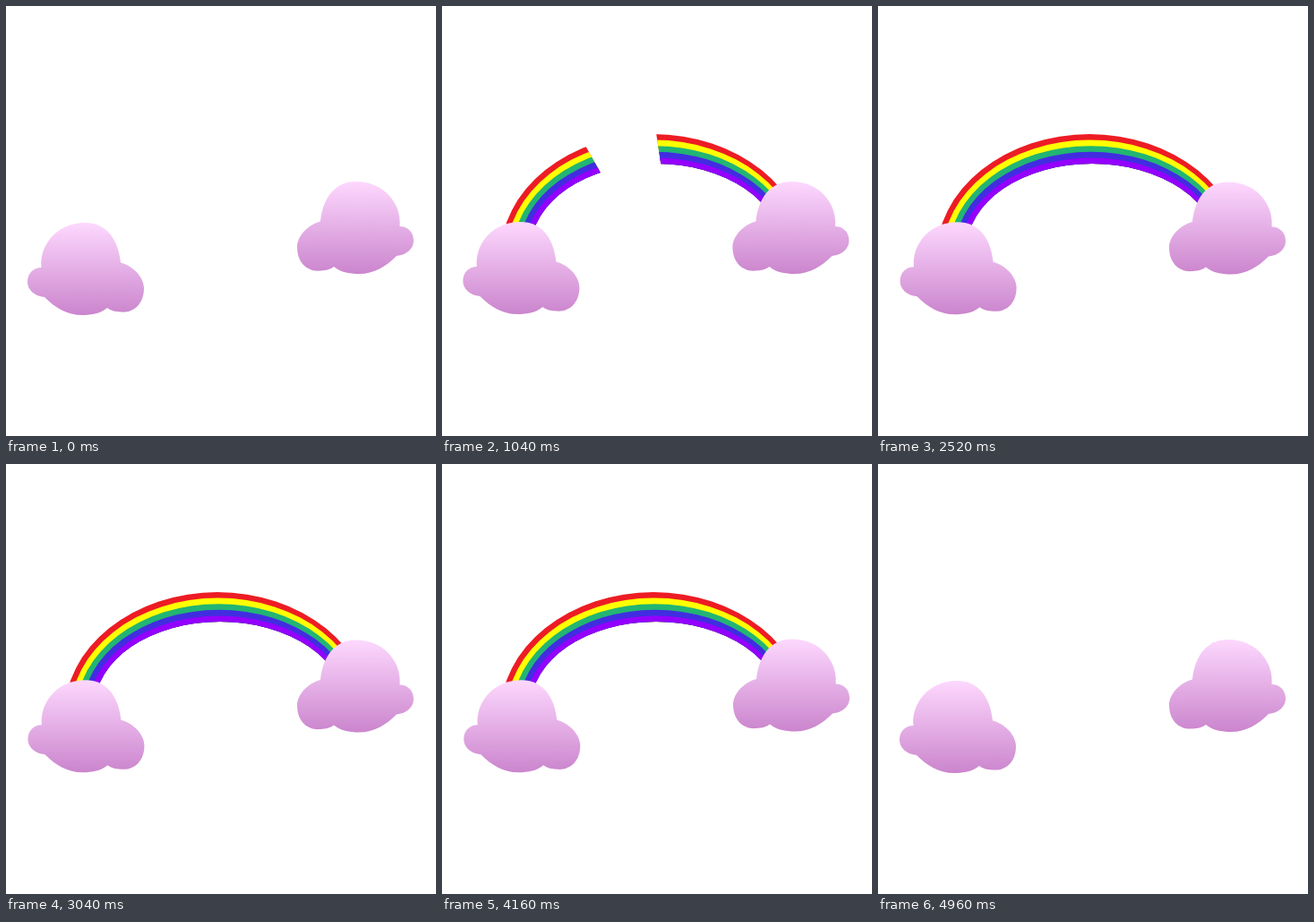
Write an HTML page with a canvas that moves like this. It is 480 by 480 pixels and loops after 5 s.

```html
<!DOCTYPE html>
<html>
<head>
<meta charset="utf-8">
<style>
html, body { margin: 0; width: 100%; height: 100%; overflow: hidden; background: #fff; }
canvas { display: block; width: 480px; height: 480px; }
</style>
</head>
<body>
<canvas id="stage" width="480" height="480"></canvas>
<script>
const ctx = document.getElementById('stage').getContext('2d');
const LOOP = 5000;
const BANDS = ['#ed1c24', '#ffff00', '#22b573', '#412de0', '#9400ff'];
const OUTER = [236, 280.5, 171, 137.5]; // centre x, centre y, radius x, radius y
const INNER = [239, 271, 140, 95];
const PIVOT = { x: 272, y: 357 };

const cloud = new Path2D(
  'M39.5 292C37 268 56 242 88 242C116 242 126 266 128 286.5' +
  'C142 290 154 303 154 315C154 333 142 343 128 341.5C121 341 117 340 113 337' +
  'C106 343 96 345 85 345C68 345 55 337 43 325C32 324 24 317 24 308C24 298 31 292 39.5 292Z');
const cloudFill = ctx.createLinearGradient(0, 242, 0, 345);
cloudFill.addColorStop(0, '#fdd8fe');
cloudFill.addColorStop(1, '#cb85cd');

// Keys are [time, dx, dy]
const LEFT_DRIFT = [[0, 0, 0], [500, -.5, -.8], [1040, -.6, -1], [1720, -.6, -1],
  [2520, .6, -.8], [3480, .3, -.8], [4160, .3, -.7], [5000, 0, 0]];
const RIGHT_DRIFT = [[0, 0, 0], [1040, -.6, 0], [1720, 0, .5], [3480, 0, .5],
  [4160, 0, -.5], [5000, 0, 0]];

const mix = (a, b, k) => a + (b - a) * k;

function drift(keys, t) {
  const i = keys.findIndex(key => key[0] > t);
  const a = keys[i - 1], b = keys[i], k = (t - a[0]) / (b[0] - a[0]);
  return [mix(a[1], b[1], k), mix(a[2], b[2], k)];
}

function drawCloud([dx, dy], mirrored) {
  ctx.save();
  ctx.translate(dx, dy);
  if (mirrored) {
    ctx.translate(479, -46);
    ctx.scale(-1, 1);
  }
  ctx.fillStyle = cloudFill;
  ctx.fill(cloud);
  ctx.restore();
}

// Each band is filled down to the inner edge, so later bands cover it
function drawBands() {
  BANDS.forEach((color, i) => {
    const edge = OUTER.map((v, j) => mix(v, INNER[j], i / BANDS.length));
    const ring = new Path2D();
    for (const [x, y, rx, ry] of [edge, INNER]) {
      ring.moveTo(x + rx, y);
      ring.ellipse(x, y, rx, ry, 0, 0, 2 * Math.PI);
    }
    ctx.fillStyle = color;
    ctx.fill(ring, 'evenodd');
  });
}

// Angles in degrees, clockwise from straight up
function drawSector(from, to) {
  if (to <= from) return;
  const rad = deg => (deg - 90) * Math.PI / 180;
  ctx.save();
  ctx.beginPath();
  ctx.moveTo(PIVOT.x, PIVOT.y);
  ctx.arc(PIVOT.x, PIVOT.y, 400, rad(from), rad(to));
  ctx.closePath();
  ctx.clip();
  drawBands();
  ctx.restore();
}

function drawRainbow(t) {
  const phase = Math.min(t, 5560 - t);
  const sweep = 0.0945 * (phase - 1040);
  const left = -29.1 + sweep, right = -8.7 - sweep;
  if (left >= right) {
    drawSector(-65, 40);
  } else {
    drawSector(-65, left);
    drawSector(right, 40);
  }
}

function render(now) {
  const t = Math.floor(now % LOOP / 40) * 40;
  ctx.fillStyle = '#fff';
  ctx.fillRect(0, 0, 480, 480);
  drawRainbow(t);
  drawCloud(drift(LEFT_DRIFT, t), false);
  drawCloud(drift(RIGHT_DRIFT, t), true);
}

const start = performance.now();
function frame() {
  render(performance.now() - start);
  requestAnimationFrame(frame);
}
frame();
</script>
</body>
</html>
```
